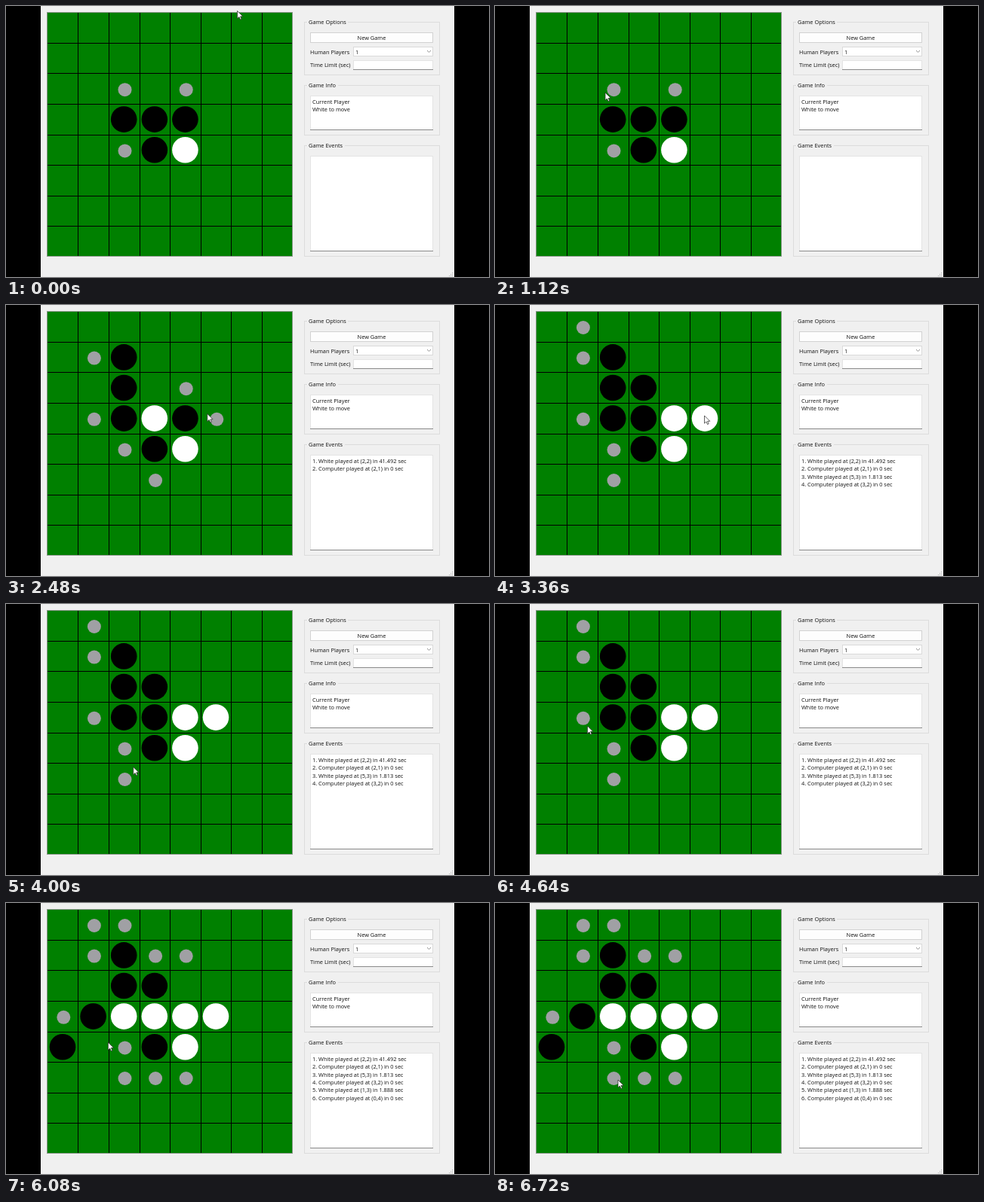
Animation, 640 px wide and 360 px high, one loop 6.8 s. Source, as an HTML page with a canvas:

```html
<!DOCTYPE html>
<html lang="en">
<head>
<meta charset="utf-8">
<title>Board game</title>
<style>
html, body { margin: 0; width: 100%; height: 100%; overflow: hidden; background: #000; }
canvas { display: block; width: 640px; height: 360px; }
</style>
</head>
<body>
<canvas id="stage" width="640" height="360"></canvas>
<script>
const ctx = document.getElementById('stage').getContext('2d');
const LOOP = 6800, STEP = 80, CELL = 40.6;

// Reversi rules
const DIRS = [[1, 0], [1, 1], [0, 1], [-1, 1], [-1, 0], [-1, -1], [0, -1], [1, -1]];
const key = (x, y) => x + ',' + y;

function flips(board, x, y, side) {
  const all = [];
  if (board[key(x, y)]) return all;
  for (const [dx, dy] of DIRS) {
    const run = [];
    let cx = x + dx, cy = y + dy;
    while (board[key(cx, cy)] && board[key(cx, cy)] !== side) {
      run.push(key(cx, cy));
      cx += dx;
      cy += dy;
    }
    if (board[key(cx, cy)] === side) all.push(...run);
  }
  return all;
}

function play(board, x, y, side) {
  const next = { ...board, [key(x, y)]: side };
  for (const k of flips(board, x, y, side)) next[k] = side;
  return next;
}

function whiteMoves(board) {
  const spots = [];
  for (let y = 0; y < 8; y++)
    for (let x = 0; x < 8; x++)
      if (flips(board, x, y, 'W').length) spots.push([x, y]);
  return spots;
}

const turns = [
  { at: 1520, white: [2, 2], black: [2, 1], secs: 41.492 },
  { at: 3280, white: [5, 3], black: [3, 2], secs: 1.813 },
  { at: 5200, white: [1, 3], black: [0, 4], secs: 1.888 }
];

let board = { '2,3': 'B', '3,3': 'B', '4,3': 'B', '3,4': 'B', '4,4': 'W' };
let log = [];
const states = [{ at: 0, board, log, hints: whiteMoves(board) }];
for (const { at, white, black, secs } of turns) {
  board = play(play(board, ...white, 'W'), ...black, 'B');
  log = [...log,
    `${log.length + 1}. White played at (${white}) in ${secs} sec`,
    `${log.length + 2}. Computer played at (${black}) in 0 sec`];
  states.push({ at, board, log, hints: whiteMoves(board) });
}

// Pointer path: time, x, y
const path = [
  [0, 306.5, 6.5], [160, 306, 7], [1040, 146, 115], [1680, 147, 116],
  [2400, 266.5, 144], [2560, 267, 145], [3040, 277.5, 147], [3600, 277.5, 147],
  [4080, 160, 222], [4560, 122.5, 162], [5840, 122.5, 162], [6480, 163, 235], [LOOP, 163, 235]
];

function pointerAt(t) {
  const i = path.findIndex(p => p[0] > t);
  const [t0, x0, y0] = path[i - 1], [t1, x1, y1] = path[i];
  const u = (t - t0) / (t1 - t0), e = u * u * (3 - 2 * u);
  return [x0 + (x1 - x0) * e, y0 + (y1 - y0) * e];
}

function rect(x, y, w, h, color) {
  ctx.fillStyle = color;
  ctx.fillRect(x, y, w, h);
}

function frame(x, y, w, h, color) {
  ctx.strokeStyle = color;
  ctx.lineWidth = 1;
  ctx.strokeRect(x + 0.5, y + 0.5, w - 1, h - 1);
}

function disc(x, y, r, color) {
  ctx.fillStyle = color;
  ctx.beginPath();
  ctx.arc(x, y, r, 0, Math.PI * 2);
  ctx.fill();
}

function text(s, x, y, align = 'left') {
  ctx.font = '7.4px "Open Sans", "Noto Sans", sans-serif';
  ctx.textAlign = align;
  ctx.fillStyle = '#111';
  ctx.fillText(s, x, y);
}

function group(title, y, h, gap) {
  frame(395, y, 180, h, '#dcdcdc');
  rect(399, y - 2, gap, 5, '#f0f0f0');
  text(title, 401, y + 3);
}

function field(x, y, w, h) {
  rect(x, y, w, h, '#fff');
  frame(x, y, w, h, '#e4e4e4');
  rect(x, y + h - 1, w, 1, '#8a8a8a');
}

function drawPanel(log) {
  group('Game Options', 21, 71, 54);
  rect(403, 35, 163, 14, '#fdfdfd');
  frame(403, 35, 163, 14, '#d2d2d2');
  text('New Game', 484.5, 45, 'center');
  text('Human Players', 403, 63.5);
  rect(460, 54, 106, 13, '#fff');
  frame(460, 54, 106, 13, '#dadada');
  text('1', 463, 63.5);
  ctx.strokeStyle = '#777';
  ctx.lineWidth = 0.8;
  ctx.beginPath();
  ctx.moveTo(558, 59);
  ctx.lineTo(560.5, 61.5);
  ctx.lineTo(563, 59);
  ctx.stroke();
  text('Time Limit (sec)', 403, 81);
  field(460, 72, 106, 13);

  group('Game Info', 105, 67, 41);
  field(403, 119, 163, 46);
  text('Current Player', 406, 130);
  text('White to move', 406, 140.3);

  group('Game Events', 185, 148, 50);
  field(403, 199, 163, 127);
  log.forEach((line, i) => text(line, 406, 209.7 + i * 10.4));

  for (let i = 0; i < 3; i++)
    for (let j = 0; j <= i; j++) rect(591 - j * 2, 354 + i * 2, 1, 1, '#b4b4b4');
}

function drawBoard({ board, hints }) {
  rect(54, 8, 326, 325, '#8c988c');
  rect(55, 9, 324, 323, '#008000');
  for (let i = 1; i < 8; i++) {
    rect(Math.floor(55.4 + i * 40.55), 9, 1, 323, '#000');
    rect(55, Math.floor(8.8 + i * 40.55), 324, 1, '#000');
  }
  for (const k in board) {
    const [x, y] = k.split(',').map(Number);
    disc(75 + x * CELL, 28.8 + y * CELL, 17.3, board[k] === 'W' ? '#fff' : '#000');
  }
  for (const [x, y] of hints) disc(76.3 + x * CELL, 30 + y * CELL, 9, '#a0a0a4');
}

const arrow = [[0, 0], [0, 10.2], [2.4, 8], [4, 11.6], [5.6, 10.9], [4.1, 7.4], [7.3, 7.3]];

function drawPointer(x, y) {
  ctx.beginPath();
  for (const [dx, dy] of arrow) ctx.lineTo(x + dx, y + dy);
  ctx.closePath();
  ctx.fillStyle = '#fff';
  ctx.fill();
  ctx.strokeStyle = '#222';
  ctx.lineWidth = 0.7;
  ctx.stroke();
}

function draw(now) {
  const t = Math.floor((now % LOOP) / STEP) * STEP;
  const state = states.filter(s => s.at <= t).pop();
  rect(0, 0, 640, 360, '#000');
  rect(46, 0, 548, 360, '#f0f0f0');
  drawBoard(state);
  drawPanel(state.log);
  drawPointer(...pointerAt(t));
}

const start = performance.now();
function tick() {
  draw(performance.now() - start);
  requestAnimationFrame(tick);
}
tick();
</script>
</body>
</html>
```
